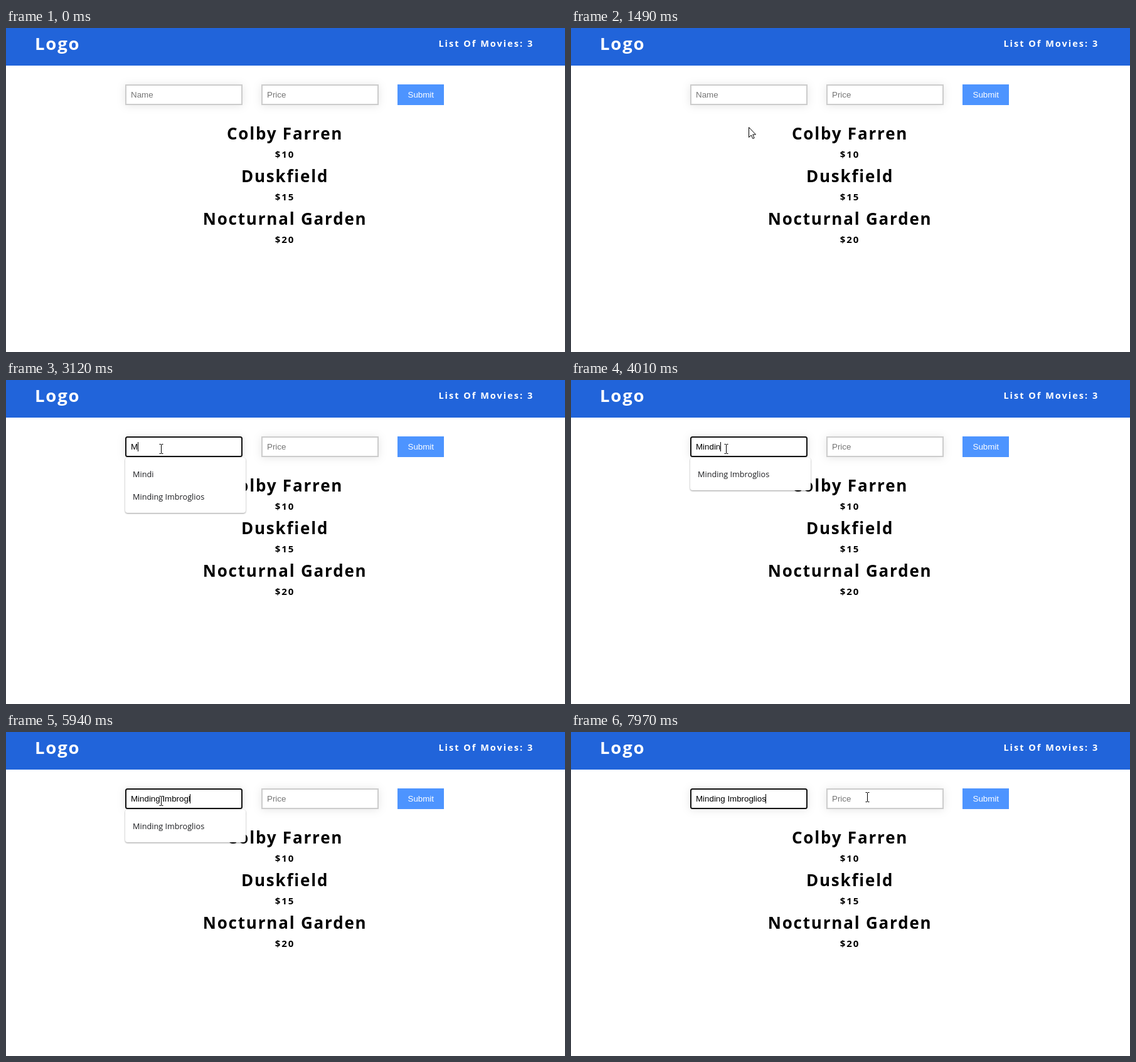
Recreate the animation shown at these times as an HTML page. Size 891x517 px, loop 8000 ms.

```html
<!DOCTYPE html>
<html lang="en">
<head>
<meta charset="utf-8">
<title>Movie list</title>
<style>
  html, body { margin: 0; width: 100%; height: 100%; overflow: hidden; background: #fff; }
  svg { display: block; width: 891px; height: 517px; }
  text { white-space: pre; }
  .bold { font-family: "Open Sans", "Noto Sans", sans-serif; font-weight: 700; }
  .title { font-size: 26px; letter-spacing: 1.8px; text-anchor: middle; }
  .price { font-size: 15px; letter-spacing: 2px; text-anchor: middle; }
  .logo { font-size: 27.5px; letter-spacing: 1.8px; fill: #fff; }
  .count { font-size: 14.5px; letter-spacing: 2px; fill: #fff; }
  .field { font: 13.333px "Liberation Sans", Arial, sans-serif; }
  .hint { fill: #757575; }
  .box { fill: #fff; stroke: #ccc; stroke-width: 2; }
  .shade { fill: #fff; filter: drop-shadow(0 1px 7px rgba(0, 0, 0, .1)); }
  .menu { fill: #fff; filter: drop-shadow(0 1px 1.2px rgba(0, 0, 0, .4)); }
  .option { font: 12.7px "Open Sans", "Noto Sans", sans-serif; fill: #1c1d20; }
</style>
</head>
<body>
<svg viewBox="0 0 891 517">
  <rect width="891" height="517" fill="#fff"/>
  <rect width="891" height="60" fill="#2164da"/>
  <text class="bold logo" x="46" y="35">Logo</text>
  <text class="bold count" x="689.4" y="30">List Of Movies: 3</text>

  <g id="movies"></g>

  <rect class="shade" x="190" y="90" width="187" height="33"/>
  <rect class="shade" x="407" y="90" width="187" height="33"/>
  <rect class="box" id="nameBox" x="191" y="91" width="185" height="31"/>
  <rect class="box" x="408" y="91" width="185" height="31"/>
  <text class="field hint" x="416" y="111">Price</text>
  <rect x="624" y="90" width="74" height="33" fill="#4d94ff"/>
  <text class="field" x="640.5" y="111" fill="#fff">Submit</text>

  <g id="menu">
    <rect class="menu" id="menuBox" x="190" y="124" width="192" rx="4"/>
    <g id="options"></g>
  </g>

  <circle id="press" cx="245" cy="109" r="12" fill="#fffb80"/>
  <text class="field" id="nameText" x="199" y="111"></text>
  <rect id="caret" y="99" width="1" height="15"/>

  <path id="arrow" d="M.5 .5V16.5L4.2 13L6.8 18.5L9.2 17.5L6.7 12H11.5Z" fill="#fff" stroke="#000"/>
  <path id="beam" d="M.5 -7V7M-2.5 -7.5H0M1 -7.5H3.5M-2.5 7.5H0M1 7.5H3.5" fill="none" stroke="#000"/>
</svg>
<script>
const LOOP = 8000;
const NS = "http://www.w3.org/2000/svg";
const $ = id => document.getElementById(id);

const movies = [["Colby Farren", 10], ["Duskfield", 15], ["Nocturnal Garden", 20]];
const history = ["Tavi", "anon", "kemto", "otz7", "MapleFern", "Cloudmask"];
const typed = "Minding Imbroglios";
const matches = [typed.slice(0, 5), typed];

// When each letter of the name is typed
const keyTimes = [3030, 3220, 3550, 3680, 3810, 4010, 4200, 4400, 4670,
  4930, 5150, 5360, 5620, 5810, 5940, 6220, 6490, 6890];

// Pointer stops: time, shape, x, y
const stops = [
  [0, ""],
  [410, "arrow", 839, 505], [475, "arrow", 771, 446], [540, "arrow", 707, 391],
  [740, "arrow", 704, 390], [810, "arrow", 618, 352], [880, "beam", 528, 319],
  [1080, "beam", 480, 300], [1150, "arrow", 410, 262], [1220, "arrow", 352, 229],
  [1490, "arrow", 283, 158], [1550, "beam", 247, 110],
  [7160, "beam", 262, 108], [7240, "beam", 304, 104], [7320, "beam", 348, 100],
  [7400, "arrow", 391, 89], [7490, "beam", 428, 100], [7570, "beam", 458, 105],
  [7650, "beam", 477, 107], [7970, "beam", 472, 104]
];

// Open menu lists: time, entries
const menus = [[0, []], [2010, history], [3120, matches], [4010, [typed]], [6960, []]];

const pen = document.createElement("canvas").getContext("2d");
pen.font = '13.333px "Liberation Sans", Arial, sans-serif';

const latest = (list, t) => list.filter(row => row[0] <= t).pop();
const within = (t, from, to) => t >= from && t < to;
const show = (id, on) => $(id).setAttribute("visibility", on ? "visible" : "hidden");

function addText(parent, cls, x, y, content) {
  const el = document.createElementNS(NS, "text");
  el.setAttribute("class", cls);
  el.setAttribute("x", x);
  el.setAttribute("y", y);
  el.textContent = content;
  parent.append(el);
}

function setMenu(list) {
  $("menu").setAttribute("display", list.length ? "inline" : "none");
  $("menuBox").setAttribute("height", 16 + 36 * list.length);
  $("options").replaceChildren();
  list.forEach((name, i) => addText($("options"), "option", 202, 155 + 36 * i, name));
}

function setPointer([, shape, x, y]) {
  for (const id of ["arrow", "beam"]) show(id, id === shape);
  if (shape) $(shape).setAttribute("transform", `translate(${x} ${y})`);
}

let openList = null;

function draw(t) {
  const value = typed.slice(0, keyTimes.filter(k => k <= t).length);
  const focused = t >= 1880;

  const box = $("nameBox");
  box.style.stroke = focused ? "#101010" : "";
  box.setAttribute("rx", focused ? 2.5 : 0);

  const label = $("nameText");
  label.textContent = value || "Name";
  label.setAttribute("fill", value ? "#000" : "#757575");

  $("caret").setAttribute("x", 199 + Math.floor(pen.measureText(value).width));
  show("caret", focused && !within(t, 2550, 3030) && !within(t, 7490, 7970));
  show("press", within(t, 1880, 2150));

  const list = latest(menus, t)[1];
  if (list !== openList) setMenu(openList = list);
  setPointer(latest(stops, t));
}

movies.forEach(([name, price], i) => {
  addText($("movies"), "bold title", 444.6, 178 + 68 * i, name);
  addText($("movies"), "bold price", 444.6, 207 + 68 * i, "$" + price);
});

function tick() {
  draw(performance.now() % LOOP);
  requestAnimationFrame(tick);
}
tick();
</script>
</body>
</html>
```
